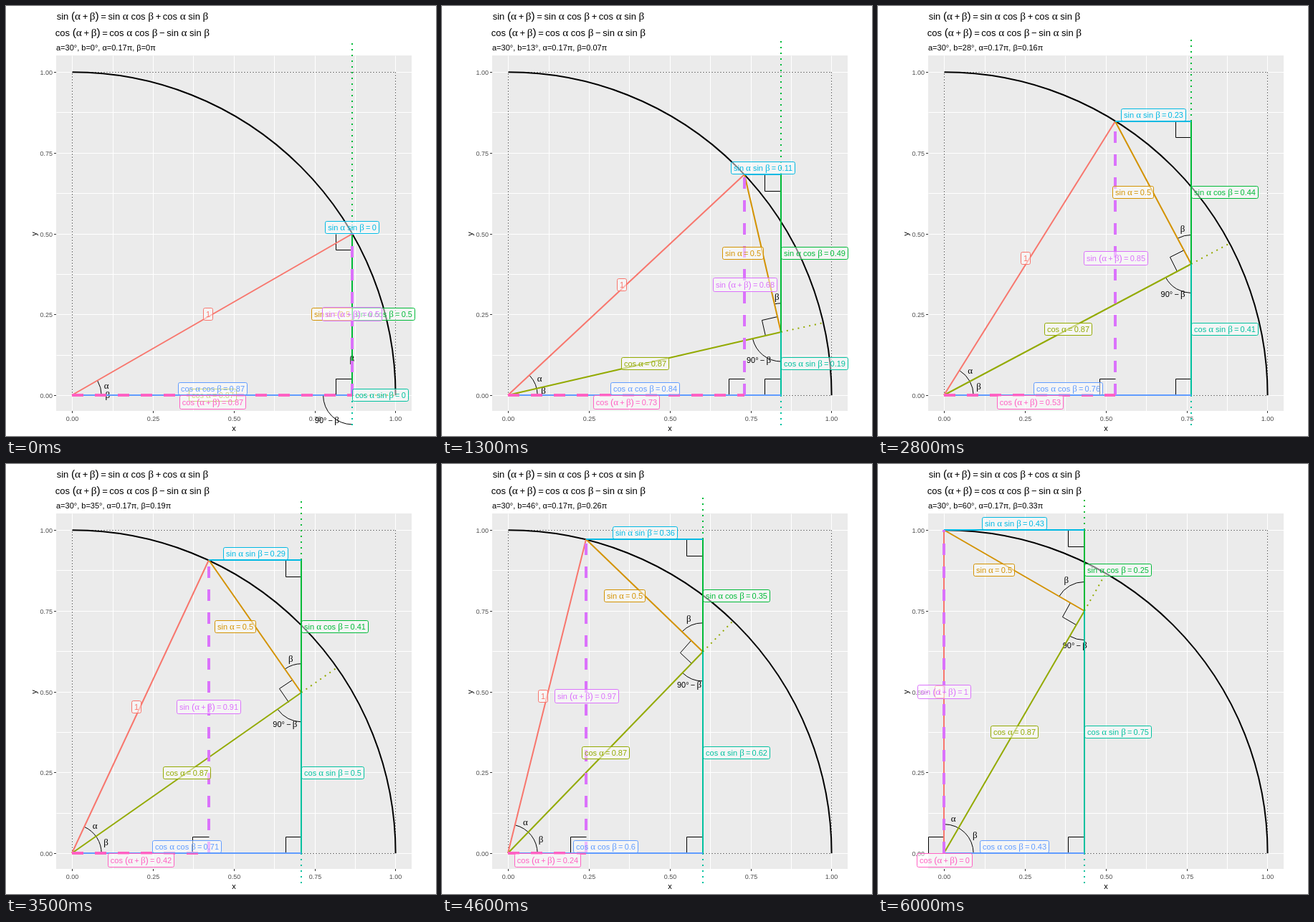
These frames come from a looping animation (600 by 600 pixels, 6.1 s). An HTML page with a canvas:

```html
<!DOCTYPE html>
<html lang="en">
<head>
<meta charset="utf-8">
<title>Angle sum identities</title>
<style>
  html, body { margin: 0; width: 100%; height: 100%; overflow: hidden; background: #fff; }
  canvas { display: block; }
</style>
</head>
<body>
<canvas id="stage" width="600" height="600"></canvas>
<script>
const ctx = document.getElementById('stage').getContext('2d');
const SANS = '"Liberation Sans", Arial, sans-serif';
const GREEK = '"Liberation Serif", "Times New Roman", serif';
const UNIT = 451, STEP_MS = 100, STEPS = 61;
const { sin, cos, PI, round } = Math;
const rad = deg => deg * PI / 180;
const px = x => 92.3 + UNIT * x;
const py = y => 543 - UNIT * y;
const short = v => String(+v.toFixed(2) + 0);
const mid = (p, q) => [(p[0] + q[0]) / 2, (p[1] + q[1]) / 2];
const polar = ([x, y], r, angle) => [x + r * cos(angle), y + r * sin(angle)];

function line(points, color = '#000', width = 1, dash = []) {
  const snap = width % 2 / 2;
  ctx.beginPath();
  for (const [x, y] of points) ctx.lineTo(round(px(x)) + snap, round(py(y)) + snap);
  ctx.strokeStyle = color;
  ctx.lineWidth = width;
  ctx.setLineDash(dash.map(d => d * width));
  ctx.stroke();
}

function arc([x, y], r, from, to, width = 1) {
  ctx.beginPath();
  ctx.arc(px(x) + .3, py(y) + .3, r * UNIT, -from, -to, true);
  ctx.strokeStyle = '#000';
  ctx.lineWidth = width;
  ctx.setLineDash([]);
  ctx.stroke();
}

function text(str, x, y, size, color = '#000', align = 'left') {
  ctx.font = `${size}px ${SANS}`;
  ctx.fillStyle = color;
  ctx.textAlign = align;
  ctx.fillText(str, x, y);
}

// Formula layout: serif Greek, taller brackets, padded operators.
function layout(str, size) {
  let width = 0;
  const parts = str.match(/[αβ]|[+=−]|[()]|[^αβ+=−()]+/g).map(s => {
    const greek = /[αβ]/.test(s), bracket = /[()]/.test(s);
    const font = `${size * (greek || bracket ? 1.18 : 1)}px ${greek ? GREEK : SANS}`;
    const gap = /[+=−]/.test(s) ? size * .2 : 0;
    ctx.font = font;
    const x = width + gap;
    width = x + ctx.measureText(s).width + gap;
    return { s, font, x };
  });
  return { parts, width };
}

function formula({ parts, width }, centerX, baseline, color = '#000') {
  ctx.fillStyle = color;
  ctx.textAlign = 'left';
  for (const { s, font, x } of parts) {
    ctx.font = font;
    ctx.fillText(s, centerX - width / 2 + x, baseline);
  }
}

function label(str, [x, y], color, hjust = .5, vjust = .5) {
  const body = layout(str, 11);
  const w = round(body.width + 7), h = str.includes('(') ? 20 : 18;
  const left = round(px(x) - hjust * w), top = round(py(y) - (1 - vjust) * h);
  ctx.beginPath();
  ctx.roundRect(left + .5, top + .5, w, h - 1, 2.2);
  ctx.fillStyle = 'rgba(255,255,255,.5)';
  ctx.fill();
  ctx.strokeStyle = color;
  ctx.lineWidth = 1;
  ctx.setLineDash([]);
  ctx.stroke();
  formula(body, left + w / 2 + .5, top + h / 2 + 4, color);
}

function mark(str, center, angle) {
  const [x, y] = polar(center, .11, angle);
  formula(layout(str, 11), px(x), py(y) + 4);
}

function rightAngle(corner, dirA, dirB) {
  const a = polar(corner, .05, dirA), b = polar(corner, .05, dirB);
  line([a, polar(a, .05, dirB), b]);
}

function drawPlot(b, beta) {
  ctx.fillStyle = '#fff';
  ctx.fillRect(0, 0, 600, 600);
  ctx.fillStyle = '#ebebeb';
  ctx.fillRect(70, 69, 496, 496);

  for (let i = 0; i <= 8; i++) {
    const v = i / 8;
    line([[v, -.05], [v, 1.05]], '#fff');
    line([[-.05, v], [1.05, v]], '#fff');
  }
  ctx.fillStyle = '#333';
  for (let i = 0; i <= 4; i++) {
    const v = i / 4, x = round(px(v)), y = round(py(v));
    ctx.fillStyle = '#333';
    ctx.fillRect(x, 565, 1, 3);
    ctx.fillRect(67, y, 3, 1);
    text(v.toFixed(2), x + .5, 579, 9, '#4d4d4d', 'center');
    text(v.toFixed(2), 65, y + 4, 9, '#4d4d4d', 'right');
  }
  text('x', 318, 593, 11, '#000', 'center');
  ctx.save();
  ctx.translate(43, 318);
  ctx.rotate(-PI / 2);
  text('y', 0, 0, 11, '#000', 'center');
  ctx.restore();

  formula(layout('sin (α+β)=sin α cos β+cos α sin β', 13), 176.5, 19);
  formula(layout('cos (α+β)=cos α cos β−sin α sin β', 13), 176.5, 42);
  text(`a=30°, b=${b}°, α=0.17π, β=${short(beta / PI)}π`, 70, 62, 11);
}

function draw(b) {
  const alpha = rad(30), beta = rad(b), sum = alpha + beta;
  const O = [0, 0], P = [cos(sum), sin(sum)], E = [cos(beta), sin(beta)];
  const Q = [cos(alpha) * E[0], cos(alpha) * E[1]];
  const foot = [Q[0], 0], top = [Q[0], P[1]], drop = [P[0], 0];
  const UP = PI / 2, LEFT = PI, DOWN = 3 * PI / 2;

  drawPlot(b, beta);

  line([[0, 0], [0, 1]], '#000', 1, [1, 3]);
  line([[0, 1], [1, 1]], '#000', 1, [1, 3]);
  line([[1, 1], [1, 0]], '#000', 1, [1, 3]);
  line([[0, 0], [1, 0]], '#000', 1, [1, 3]);
  arc(O, 1, 0, UP, 2);

  rightAngle(foot, LEFT, UP);
  rightAngle(drop, LEFT, UP);
  rightAngle(top, LEFT, DOWN);
  rightAngle(Q, LEFT + beta, UP + beta);
  arc(O, .09, 0, sum);
  arc(Q, .09, UP, UP + beta);
  arc(Q, .09, LEFT + beta, DOWN);
  mark('α', O, beta + alpha / 2);
  mark('β', O, beta / 2);
  mark('β', Q, UP + beta / 2);
  mark('90°−β', Q, (LEFT + beta + DOWN) / 2);

  const dotted = [1, 3], dashed = [4, 4];
  const red = '#F8766D', amber = '#D39200', olive = '#93AA00', green = '#00BA38', teal = '#00C19F',
    cyan = '#00B9E3', blue = '#619CFF', purple = '#DB72FB', pink = '#FF61C3';

  line([Q, E], olive, 2, dotted);
  line([top, [Q[0], 1.1]], green, 2, dotted);
  line([foot, [Q[0], -.1]], teal, 2, dotted);
  line([O, P], red, 2);
  line([P, Q], amber, 2);
  line([O, Q], olive, 2);
  line([Q, top], green, 2);
  line([foot, Q], teal, 2);
  line([P, top], cyan, 2);
  line([O, foot], blue, 2);
  line([drop, P], purple, 4, dashed);
  line([O, drop], pink, 4, dashed);

  label('1', mid(O, P), red, 1);
  label('sin α=0.5', mid(P, Q), amber, 1);
  label('cos α=0.87', mid(O, Q), olive);
  label('sin α cos β=' + short(P[1] - Q[1]), mid(Q, top), green, 0);
  label('cos α sin β=' + short(Q[1]), mid(foot, Q), teal, 0);
  label('sin α sin β=' + short(Q[0] - P[0]), mid(P, top), cyan, .5, 0);
  label('cos α cos β=' + short(Q[0]), mid(O, foot), blue, .5, 0);
  label('sin (α+β)=' + short(P[1]), mid(drop, P), purple);
  label('cos (α+β)=' + short(P[0]), mid(O, drop), pink, .5, 1);
}

const start = performance.now();
function tick() {
  draw(Math.floor((performance.now() - start) / STEP_MS) % STEPS);
  requestAnimationFrame(tick);
}
tick();
</script>
</body>
</html>
```
